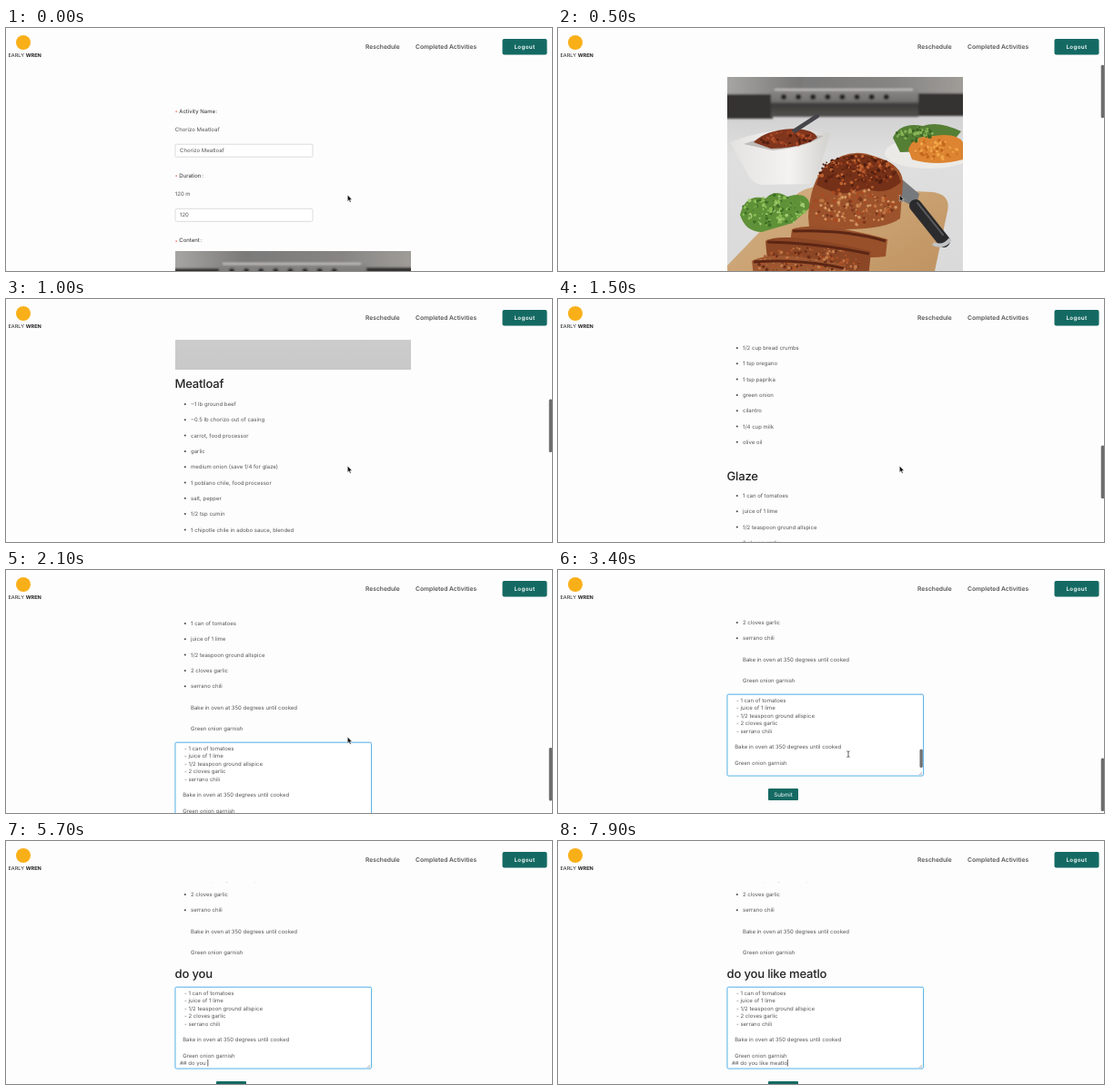
Animation of 600 by 268 pixels, one loop 8000 ms. Source, as an HTML page:

```html
<!DOCTYPE html>
<html lang="en">
<head>
<meta charset="utf-8">
<title>Activity editor</title>
<style>
html, body { margin: 0; width: 100%; height: 100%; overflow: hidden; background: #fdfdfd; }
svg { display: block; width: 600px; height: 268px; }
text { font: 6px Inter, "Open Sans", sans-serif; fill: #555; white-space: pre; text-rendering: geometricPrecision; }
.label { fill: #2b2b2b; }
.star { font-size: 5.4px; fill: #e8604c; }
.head { font-size: 13.1px; font-weight: 500; letter-spacing: -.2px; fill: #222; }
.nav { font-size: 6.7px; font-weight: 600; }
.white { fill: #fff; }
.box { fill: #fff; stroke: #d3d3d3; stroke-width: .8; }
.button { fill: #146a63; }
</style>
</head>
<body>
<svg viewBox="0 0 600 268">
  <defs>
    <linearGradient id="counter" x2="0" y2="1">
      <stop offset="0" stop-color="#c4c4c4"/><stop offset=".25" stop-color="#dfdfdf"/>
      <stop offset=".6" stop-color="#dadada"/><stop offset="1" stop-color="#c8c8c8"/>
    </linearGradient>
    <linearGradient id="steel" x2="0" y2="1">
      <stop offset="0" stop-color="#8d8c8b"/><stop offset=".45" stop-color="#73716f"/><stop offset=".55" stop-color="#3b3a39"/><stop offset="1" stop-color="#55534f"/>
    </linearGradient>
    <linearGradient id="wall" x2="1" y2="0">
      <stop offset="0" stop-color="#a9a8a6"/><stop offset=".3" stop-color="#7b7a79"/>
      <stop offset=".7" stop-color="#868584"/><stop offset="1" stop-color="#a19e99"/>
    </linearGradient>
    <linearGradient id="bowl" x2="1" y2="0">
      <stop offset="0" stop-color="#e3e2e0"/><stop offset=".6" stop-color="#f4f3f1"/><stop offset="1" stop-color="#d2d0cd"/>
    </linearGradient>
    <linearGradient id="wood" x2="1" y2="1">
      <stop offset="0" stop-color="#d5b184"/><stop offset="1" stop-color="#bd8f5c"/>
    </linearGradient>
    <filter id="soft" x="-5%" width="110%" y="-10%" height="120%"><feGaussianBlur stdDeviation="1.3"/></filter>
    <clipPath id="frame"><rect width="259" height="345"/></clipPath>
  </defs>

  <g id="page">
    <g id="form"></g>
    <g transform="translate(186 246)" clip-path="url(#frame)">
      <rect width="259" height="345" fill="url(#counter)"/>
      <g filter="url(#soft)">
        <rect x="-5" y="-5" width="269" height="30" fill="url(#wall)"/>
        <path d="M-5 19H50V46H-5ZM208 18H264V43H208Z" fill="#353332"/>
        <path d="M48 13H210V44H48Z" fill="url(#steel)"/>
        <path d="M52 14H204" stroke="#c2c0bd" stroke-width="2"/>
        <path d="M62 22h.1m16 0h.1m16 0h.1m16 0h.1m16 0h.1m16 0h.1m16 0h.1m16 0h.1" stroke="#242424" stroke-width="6" stroke-linecap="round"/>
      </g>
      <path d="M3 72Q55 51 113 62L99 110Q98 118 88 118L38 119Q27 117 23 108Z" fill="url(#bowl)"/>
      <path d="M18 74Q57 59 106 65Q86 78 50 81Z" fill="#bfbcb8"/>
      <path d="M29 72Q42 58 74 57Q96 58 99 67Q84 78 48 79Z" fill="#80351d"/>
      <path d="M73 60L99 43" stroke="#45454a" stroke-width="4.5" stroke-linecap="round"/>
      <ellipse cx="222" cy="84" rx="49" ry="17" fill="#eceae7"/>
      <path d="M182 67Q190 49 215 54Q232 48 257 60L240 81L190 83Z" fill="#557f35"/>
      <path d="M199 80Q204 64 227 65Q252 61 259 72V91Q230 99 203 91Z" fill="#dc8431"/>
      <path d="M0 208L72 133Q84 121 102 121L226 127Q246 130 242 148L228 214Q222 245 180 246L20 242Q0 235 0 208Z" fill="url(#wood)"/>
      <path d="M14 152Q20 128 42 134Q52 123 66 132Q90 125 91 144L72 161L38 171Q20 171 14 152Z" fill="#5f9138"/>
      <path d="M184 106L211 129L207 144L188 134Z" fill="#777a7c"/>
      <path d="M207 142L238 181" stroke="#2b2b2d" stroke-width="14" stroke-linecap="round"/>
      <path d="M209 139L237 174" stroke="#5c5c5f" stroke-width="2" stroke-linecap="round"/>
      <path d="M226 184Q238 189 245 179" fill="none" stroke="#c2c3c4" stroke-width="4"/>
      <path d="M89 154Q91 116 108 98Q134 76 163 88Q192 96 193 116L190 156Q167 173 90 166Z" fill="#9c532c"/>
      <path d="M98 119Q104 88 143 85Q183 88 191 116Q174 132 151 123Q126 135 98 119Z" fill="#753018"/>
      <path d="M71 168Q100 158 176 179L174 198Q140 203 69 184Z" fill="#98502a"/>
      <path d="M42 181Q60 169 158 192L155 222Q110 222 44 202Z" fill="#8b4625"/>
      <path d="M27 203Q50 189 130 207L126 235Q80 240 30 228Z" fill="#9c5731"/>
      <g id="crumbs"></g>
      <path d="M72 170Q130 168 174 181M44 182Q100 183 156 195M29 204Q80 200 128 211" fill="none" stroke="#5c2615" stroke-width="3"/>
    </g>
    <g id="recipe"></g>
    <g id="tail">
      <rect x="185" y="1095.3" width="217.5" height="91.4" rx="2" fill="#dceffb"/>
      <rect x="186" y="1096.2" width="215.5" height="89.8" rx="1.5" fill="#fff" stroke="#62b6e8" stroke-width="1"/>
      <g id="source"></g>
      <path d="M397 1185l3-3m-1.3 3l1.3-1.3" stroke="#888" stroke-width=".6"/>
      <rect id="innerThumb" x="397.5" y="1156.5" width="3.3" height="20.5" rx="1.6" fill="#707070"/>
      <text id="typed" x="191" y="1182.2"></text>
      <path id="caret" d="M0 1176v7.5" stroke="#222" stroke-width=".7"/>
      <rect class="button" x="231" y="1200" width="33" height="13" rx="1"/>
      <text class="white" x="247.5" y="1208.8" text-anchor="middle" style="font-size:6.2px">Submit</text>
    </g>
    <text id="preview" class="head" x="185.5" y="1108.8"></text>
  </g>

  <rect width="600" height="45" fill="#fdfdfd"/>
  <circle cx="19" cy="16" r="8" fill="#f9af18"/>
  <text x="2.5" y="32" style="font-size:5.6px;fill:#222">EARLY <tspan font-weight="700">WREN</tspan></text>
  <text class="nav" x="395" y="23">Reschedule</text>
  <text class="nav" x="450" y="23">Completed Activities</text>
  <rect class="button" x="545.5" y="12" width="49" height="17.5" rx="2"/>
  <text class="white" x="570" y="22.8" text-anchor="middle" style="font-size:6.2px;font-weight:600;letter-spacing:.35px">Logout</text>
  <rect id="thumb" x="596.7" width="3.6" height="58.5" rx="1.5" fill="#6c6c6c"/>
  <path id="arrow" d="M0 0V7.2L1.6 5.7L2.7 8.3L3.9 7.8L2.8 5.3H5Z" fill="#111" stroke="#fff" stroke-width=".5"/>
  <path id="beam" d="M317.4 199.8q1.6 0 1.6 1v4.6q0 1 -1.6 1m3.2-6.6q-1.6 0 -1.6 1m0 4.6q0 1 1.6 1" fill="none" stroke="#222" stroke-width=".7"/>
</svg>
<script>
const $ = id => document.getElementById(id);
const text = (x, mid, s, cls = "") => `<text x="${x}" y="${mid + 2.1}" class="${cls}">${s}</text>`;
const show = (id, on) => $(id).style.display = on ? "" : "none";

const label = (y, s) => text(185.8, y + 1.4, "*", "star") + text(190.3, y, s + '<tspan dx=".8">:</tspan>', "label");
const input = (y, s) => `<rect class="box" x="186" y="${y}" width="151" height="14" rx="1.5"/>` + text(191, y + 7, s);
$("form").innerHTML =
  label(91.5, "Activity Name") + text(185.8, 111.5, "Chorizo Meatloaf") + input(128.2, "Chorizo Meatloaf") +
  label(162.5, "Duration") + text(185.8, 183.3, "120 m") + input(199.3, "120") + label(234, "Content");

const list = (y, items) => items.map((s, i) => {
  const mid = y + i * 17.3;
  return `<circle cx="196.8" cy="${mid}" r="1" fill="#444"/>` + text(203, mid, s);
}).join("");
const glaze = ["1 can of tomatoes", "juice of 1 lime", "1/2 teaspoon ground allspice", "2 cloves garlic", "serrano chili"];
const notes = ["Bake in oven at 350 degrees until cooked", "Green onion garnish"];
$("recipe").innerHTML =
  text(185.5, 608.6, "Meatloaf", "head") +
  list(629, ["~1 lb ground beef", "~0.5 lb chorizo out of casing", "carrot, food processor", "garlic",
    "medium onion (save 1/4 for glaze)", "1 poblano chile, food processor", "salt, pepper", "1/2 tsp cumin",
    "1 chipotle chile in adobo sauce, blended", "1 egg", "1/2 cup bread crumbs", "1 tsp oregano", "1 tsp paprika",
    "green onion", "cilantro", "1/4 cup milk", "olive oil"]) +
  text(185.5, 945.6, "Glaze", "head") + list(965, glaze) +
  notes.map((s, i) => text(203, 1057.6 + i * 23, s)).join("");

$("source").innerHTML =
  glaze.map((s, i) => text(196, 1102.4 + i * 8.65, "- " + s)).join("") +
  notes.map((s, i) => text(194.2, 1154.2 + i * 17.3, s)).join("");

// Seeded flecks give the food its texture
let seed = 7;
const rnd = () => (seed = seed * 16807 % 2147483647) / 2147483647;
const flecks = (n, x, y, w, h, colors) => Array.from({ length: n }, () => {
  const a = rnd() * 6.283, r = Math.sqrt(rnd());
  return `<circle cx="${x + w * r * Math.cos(a)}" cy="${y + h * r * Math.sin(a)}" r="${.6 + rnd() * 1.5}" fill="${colors[rnd() * colors.length | 0]}"/>`;
}).join("");
$("crumbs").innerHTML =
  flecks(180, 143, 105, 44, 18, ["#4c1d10", "#9c421e", "#bd6230", "#622512"]) +
  flecks(180, 139, 143, 47, 20, ["#c17642", "#7d391e", "#d39560", "#aa4a22"]) +
  flecks(200, 92, 207, 58, 20, ["#c07a49", "#6c2f19", "#ac5329"]) +
  flecks(60, 65, 68, 29, 8, ["#b0502b", "#542011", "#983d1f"]) +
  flecks(120, 51, 147, 35, 17, ["#8abc54", "#3f7027", "#a3cc73"]) +
  flecks(60, 230, 80, 25, 11, ["#f2a648", "#c4671e"]) +
  flecks(60, 206, 63, 20, 8, ["#86b457", "#3b6524"]);

// [time, scroll position]
const scrolls = [[0, 0], [100, 42], [300, 88], [500, 192], [1000, 513], [1500, 748], [2100, 906], [2500, 959]];
function scrollAt(t) {
  const i = scrolls.findIndex(p => p[0] > t);
  if (i < 0) return 959;
  const [t0, a] = scrolls[i - 1], [t1, b] = scrolls[i];
  return a + (b - a) * (t - t0) / (t1 - t0);
}

const message = "## do you like meatlo";
const keys = [4400, 4600, 4800, 5100, 5200, 5400, 5400, 5500, 5600, 5700, 6200, 6300, 6400, 6500, 6600, 6900, 7000, 7000, 7200, 7700, 7900];

function draw(now) {
  const t = Math.floor(now % 8000 / 100) * 100;
  const typed = message.slice(0, keys.filter(k => k <= t).length);
  const hasHeading = typed.length > 3;
  const y = scrollAt(t) - (hasHeading ? 1 : 0);

  $("page").setAttribute("transform", `translate(0 ${-y})`);
  $("tail").setAttribute("transform", `translate(0 ${hasHeading ? 23 : 0})`);
  $("typed").textContent = typed;
  $("preview").textContent = typed.slice(3);
  $("caret").setAttribute("transform", `translate(${191.5 + (typed ? $("typed").getComputedTextLength() : 0)})`);
  show("caret", t >= 4200);

  $("thumb").setAttribute("y", y / 4.6 - 1);
  show("thumb", t >= 100 && t < 4000);
  show("innerThumb", t >= 2900 && t < 4000);
  $("arrow").setAttribute("transform", t < 2800 ? "translate(375.3 184)" : "translate(345 192)");
  show("arrow", t < 2900);
  show("beam", t >= 2900 && t < 4400);
  requestAnimationFrame(draw);
}
requestAnimationFrame(draw);
</script>
</body>
</html>
```
